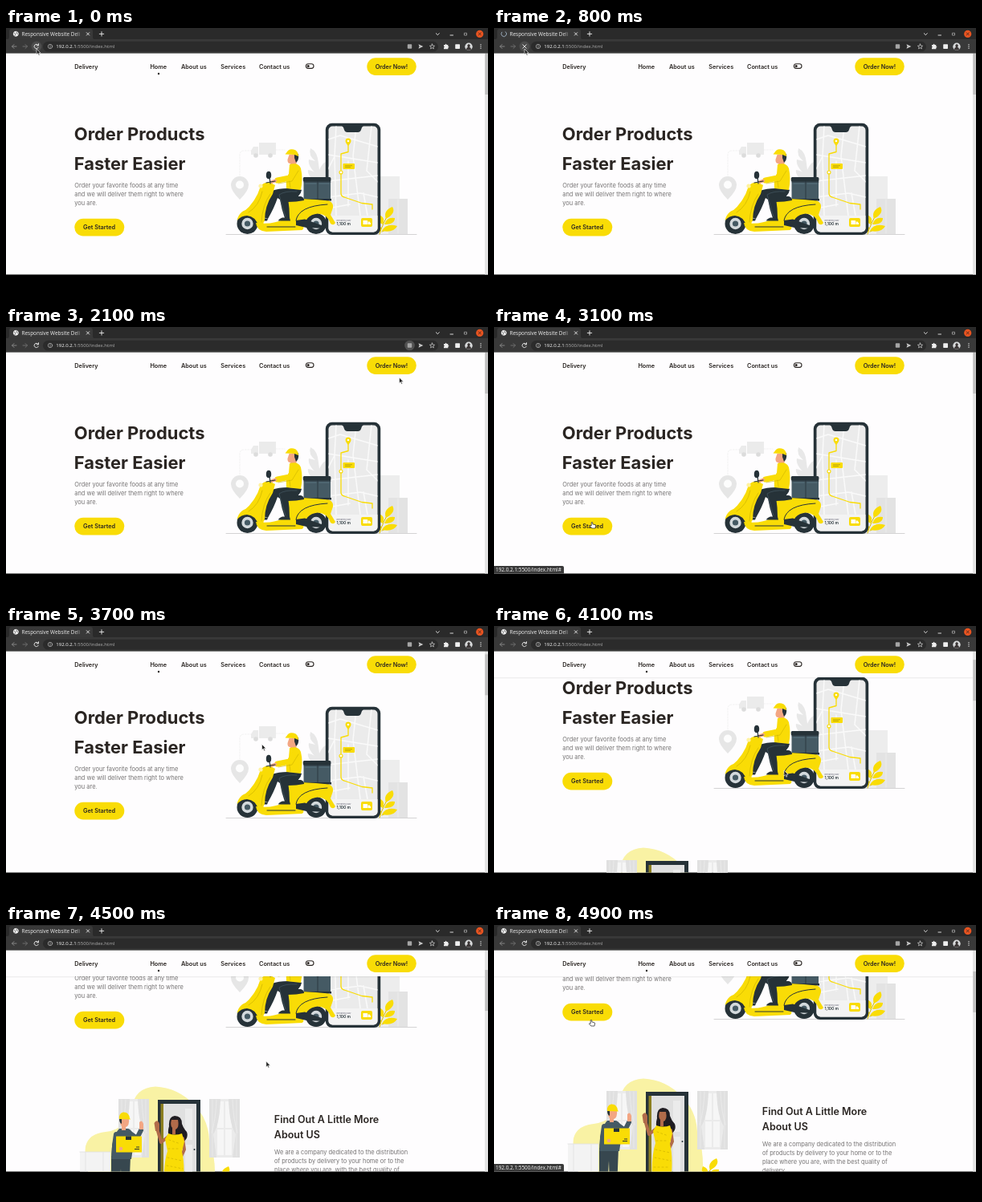
Recreate the animation shown at these times as an HTML page. Size 600 by 338 pixels, loop 5000 ms.

```html
<!DOCTYPE html>
<html lang="en">
<head>
<meta charset="utf-8">
<title>Delivery page tour</title>
<style>
html, body { margin: 0; width: 100%; height: 100%; overflow: hidden; background: #000; }
svg { display: block; width: 100vw; height: 100vh; }
text { font-family: Inter, "Open Sans", sans-serif; white-space: pre; }
.ui { font-family: "Noto Sans", "Open Sans", sans-serif; }
.nav { font-size: 7.3px; font-weight: 600; fill: #2a2522; }
.h1 { font-size: 21.9px; font-weight: 700; fill: #2a2522; }
.h2 { font-size: 12.5px; font-weight: 600; fill: #2a2522; }
.p { font-size: 7.45px; fill: #757373; }
.y { fill: #f9dc06; }
.d { fill: #263238; }
.s { fill: #455a64; }
.skin { fill: #f3a683; }
.brown { fill: #b16b4a; }
.line { fill: none; stroke-linecap: round; stroke-linejoin: round; }
</style>
</head>
<body>
<svg viewBox="0 0 600 338">
<defs>
  <clipPath id="view"><rect y="31" width="600" height="276.500"/></clipPath>
  <clipPath id="screen"><rect x="401.500" y="122.500" width="61" height="132" rx="5"/></clipPath>
  <linearGradient id="fade"><stop stop-color="#393939" stop-opacity="0"/><stop offset="1" stop-color="#393939"/></linearGradient>
  <linearGradient id="shade" x2="0" y2="1"><stop stop-color="#000" stop-opacity=".08"/><stop offset="1" stop-color="#000" stop-opacity="0"/></linearGradient>
  <g id="window">
    <path fill="#ebebeb" d="M0 0H38V73H0Z"/>
    <path fill="#f6f6f6" d="M10 3H18V36H10ZM20 3H28V36H20ZM10 38H18V70H10ZM20 38H28V70H20Z"/>
    <path fill="#e0e0e0" d="M0 0H14Q13 32 5 44L9 73H0ZM38 0H24Q25 32 33 44L29 73H38Z"/>
    <path class="line" stroke="#ededed" stroke-width=".8" d="M4 1V71M9 1Q8 26 3 42M34 1V71M29 1Q30 26 35 42"/>
  </g>
  <g id="plant">
    <path class="line" stroke="#d9bd00" stroke-width="1" d="M0 0Q4 -14 15 -32M3 -3Q11 -8 20 -9"/>
    <path class="y" d="M8 -19Q4 -29 16 -34Q21 -26 8 -19ZM4 -12Q-5 -16 -1 -24Q8 -21 4 -12ZM6 -12Q9 -22 19 -20Q19 -12 6 -12ZM3 -4Q8 -14 22 -10Q17 -1 3 -4ZM1 -2Q-4 -6 -3 -12Q4 -10 1 -2Z"/>
  </g>
  <g id="wheel">
    <circle class="d" r="13"/>
    <circle r="7.200" fill="#d3d9dc"/>
    <circle class="s" r="3.600"/>
  </g>
</defs>

<g clip-path="url(#view)">
  <rect y="31" width="600" height="277" fill="#fefdfe"/>
  <g id="page">
    <text class="h1" x="84.800" y="139.800">Order Products</text>
    <text class="h1" x="84.800" y="176.800">Faster Easier</text>
    <text class="p" x="85.300" y="198.800">Order your favorite foods at any time</text>
    <text class="p" x="85.300" y="209.800">and we will deliver them right to where</text>
    <text class="p" x="85.300" y="220.600">you are.</text>
    <rect class="y" x="85.300" y="237.800" width="62" height="21.600" rx="10.800"/>
    <text class="nav" x="96" y="251.200">Get Started</text>

    <!-- hero scenery -->
    <path class="line" stroke="#ececec" stroke-width=".7" stroke-dasharray="2 1.5" d="M291 184V158Q291 153 297 153H305M336 152H347"/>
    <path fill="#ebebeb" d="M315 143H336V158H315ZM305 158V153L308 148H314V158Z"/>
    <g fill="#dcdcdc"><circle cx="311" cy="159" r="2.800"/><circle cx="329" cy="159" r="2.800"/></g>
    <path fill="#e6e6e6" d="M291 214Q280 203 280 196A11 11 0 0 1 302 196Q302 203 291 214Z"/>
    <circle cx="291" cy="195.500" r="5" fill="#fdfdfd"/>
    <path fill="#e8e8e8" d="M385 166Q376 159 379 150Q388 154 389 169L390 177Q394 168 398 167V196H390Q374 184 376 177Q384 178 388 184Q375 172 377 164Z"/>
    <path fill="#ededed" d="M464 185H490V257H464Z"/>
    <path fill="#e3e3e3" d="M476 213H500V257H476Z"/>
    <path class="line" stroke="#f0f0f0" stroke-width=".8" d="M488 214V256"/>
    <path class="line" stroke="#c9c9c9" stroke-width=".8" d="M274 257.500H511"/>
    <use href="#plant" transform="translate(465 257)"/>

    <!-- phone -->
    <rect class="d" x="397.800" y="118.800" width="68.400" height="139.200" rx="8"/>
    <g clip-path="url(#screen)">
      <rect x="401" y="122" width="62" height="133" fill="#ebebeb"/>
      <path class="line" stroke="#fafafa" stroke-width="1.500" d="M401 139L416 134L463 148M411 122L409 160L401 176M401 158L463 168M436 122L432 160L441 234M455 122L449 178L463 192M401 191L463 184M409 160L411 234M401 211L441 206L463 211M426 166V222M445 206L450 234M401 225L428 220"/>
      <path class="line" stroke="#f9dc06" stroke-width="1.300" d="M426 143V154.500L417 157V206Q417 210 421 211L443 218.500L456 220V226"/>
      <path class="y" d="M426 147Q422.500 143 422.500 141A3.500 3.500 0 0 1 429.500 141Q429.500 143 426 147Z"/>
      <circle cx="426" cy="141" r="1.300" fill="#fff"/>
      <circle cx="417" cy="180" r="2" fill="#fff" stroke="#f9dc06" stroke-width="1.100"/>
      <rect class="y" x="419.500" y="169" width="14.500" height="7" rx="1"/>
      <path stroke="#a99500" stroke-width=".7" d="M422 171.700H431M422 173.500H429"/>
      <rect x="401" y="234" width="62" height="21" fill="#f3f3f3"/>
      <text x="411.500" y="241" font-size="2.500" fill="#667">Remaining way</text>
      <text x="411.500" y="246.300" font-size="4.900" font-weight="600" fill="#263238">1,100 m</text>
      <rect class="y" x="442" y="237" width="14" height="11" rx="2"/>
      <path fill="#fff" d="M444.500 240H450V245H444.500ZM450.500 241.500H452.500L454 243.500V245H450.500Z"/>
    </g>
    <path class="d" d="M417 121H446Q443 123 442 127Q441 130 438 130H425Q422 130 421 127Q420 123 417 121Z"/>

    <!-- scooter -->
    <use href="#wheel" x="386" y="244"/>
    <use href="#wheel" x="300.500" y="244"/>
    <rect class="s" x="370.500" y="188" width="33.500" height="26" rx="1.500"/>
    <rect class="d" x="369.800" y="186" width="34.600" height="5.500" rx="1.500"/>
    <path class="line" stroke="#263238" stroke-width=".8" d="M388 191V213M371 192H404"/>
    <path class="line" stroke="#607d8b" stroke-width=".7" d="M373 194H386M390 194H402"/>
    <path class="d" d="M366 213H405V215.500H366Z"/>
    <path class="y" d="M345 217C352 211 372 213 402 215.500Q408 218 407 224L404 233L410 243Q408 247 404 244Q400 232 388 231.500Q372 233 370 251L350 252Q346 232 345 217Z"/>
    <path class="y" d="M311 243Q332 246 346 238L372 239L369 252L324 254Q312 253 311 243Z"/>
    <path class="line" stroke="#263238" stroke-width="1" d="M361 240Q364 222 400 220M325 248H360"/>
    <path class="d" d="M361 240L372 238.500L394 246.500L398 250L374 249L361 246Z"/>
    <path class="d" d="M346 214Q346 210 352 210H367Q371 211 371 215Q360 217.500 346 217Z"/>

    <!-- rider -->
    <path class="d" d="M366 201Q344 198 331 203Q325 210 320 236L326 238Q334 224 338 212L341 214Q343 226 347 237H353Q353 225 351 212Q366 214 368 202Z"/>
    <path class="line" stroke="#455a64" stroke-width=".7" d="M362 204Q347 203 340 208Q343 220 348 235"/>
    <path class="d" d="M317 236.500L326 238L325 240.500H312Q312 238.500 317 236.500ZM344 236.500H353L354 240.500H339Q339 238.500 344 236.500Z"/>
    <path class="skin" d="M352.500 158H362V165L361 172H354V169Q350 169 350.500 164Z"/>
    <path class="d" d="M359 157H364Q365 165 361 168L359 162Z"/>
    <path class="y" d="M347.500 157.500L349.500 155Q352 150 358 151.500Q364 153 364 160L359 158Z"/>
    <path class="y" d="M353 170Q364 167 367 175Q370 188 367 202L349 200Q348 186 352 182Z"/>
    <path class="line" stroke="#f9dc06" stroke-width="7" d="M361 174L353 187L338 190"/>
    <path class="line" stroke="#cdb400" stroke-width=".6" d="M364 178L356 191L339 194M353 191L354 199"/>
    <path class="line" stroke="#f3a683" stroke-width="4" d="M335 190.500L331 192"/>

    <!-- front -->
    <path class="y" d="M317 197Q324 189 335 196L332 207Q322 222 322 240L317 249Q307 229 296 229Q311 217 317 197Z"/>
    <path class="y" d="M287.500 240Q291 225 307 226Q319 230 321 247L314 247Q311 235 300 234Q293 234 287.500 240Z"/>
    <path class="line" stroke="#cdb400" stroke-width=".7" d="M319 204Q315 222 302 230M329 207Q319 221 318 242"/>
    <path class="line" stroke="#263238" stroke-width="1.200" d="M329 194L328 186M324 193L335 191"/>
    <ellipse class="d" cx="327" cy="183.500" rx="3.200" ry="4.800"/>
    <circle cx="317" cy="197" r="2.600" fill="#fff3a0"/>

    <!-- about section -->
    <g transform="translate(0 140)">
      <path fill="#f9f2a4" d="M157 218Q160 193 186 191.500Q214 193 234 214Q252 232 253 258Q264 286 258 330H112Q96 286 99 266Q103 250 124 248Q148 246 157 218Z"/>
      <use href="#window" x="140" y="207"/>
      <use href="#window" x="253" y="207"/>
      <path fill="#f3f3f3" d="M92 273H130V330H92Z"/>
      <path class="line" stroke="#dfdfdf" stroke-width=".8" d="M92 273H130M99 274V308M121 274V308"/>
      <path class="d" d="M189 208H242V330H189Z"/>
      <path fill="#8c7f20" d="M192.500 213H196V330H192.500Z"/>
      <path fill="#e0e0e0" d="M196 213H237V330H196Z"/>
      <path fill="#ebebeb" d="M223 219H232V258H223ZM223 264H232V308H223Z"/>
      <circle class="d" cx="234.500" cy="270" r="1"/>
      <use href="#plant" transform="translate(261 325)"/>

      <path fill="#37474f" d="M131 278H155L153 330H144L143 294L141 330H131Z"/>
      <path class="s" d="M141 244H152Q158 246 160 256L156 282H131Q131 254 141 244Z"/>
      <path class="skin" d="M142 230H153Q154 241 149 242V246H144V241Q141 238 142 230Z"/>
      <path class="d" d="M141 231H144V238Q141 237 141 231Z"/>
      <path class="y" d="M141 232Q140 225 146 223.500Q153 223 154 231L155 232.500Z"/>
      <path class="line" stroke="#455a64" stroke-width="6" d="M137 251L135 265L142 268M156 251L163 256L168 246"/>
      <path class="skin" d="M166 245L166 236Q169 232 171 238L171 245Z"/>
      <rect class="y" x="137" y="253.500" width="32" height="20" rx=".6"/>
      <path fill="#263238" d="M149 253.500H156V258H149ZM160 269H166V270H160ZM162 266.500H166V267.500H162Z"/>
      <circle class="skin" cx="143" cy="269" r="2.300"/>

      <path fill="#201d22" d="M203 241Q202 229 210 228Q219 228 219 238Q221 244 225 248Q228 256 219 262L205 259Q200 251 203 241Z"/>
      <path class="brown" d="M206 233H214Q216 243 211 245V251H207V243Q204 240 206 233Z"/>
      <path class="line" stroke="#b16b4a" stroke-width="4" d="M202 254L193 261L189 247M220 256L222 270L217 281"/>
      <path class="brown" d="M186 247L184.500 237Q188 231 191 238L191 247Z"/>
      <path class="y" d="M202 250Q211 253 219 250L222 260L219 273Q224 292 219 330H197Q195 290 201 272L198 257Z"/>
      <path class="line" stroke="#cfb400" stroke-width=".7" stroke-dasharray="2 3" d="M203 258L217 263M202 269H217M201 280L219 284M200 290L220 294M199 302H219"/>

      <text class="h2" x="333.800" y="237.300">Find Out A Little More</text>
      <text class="h2" x="333.800" y="255.800">About US</text>
      <text class="p" x="334" y="276.300">We are a company dedicated to the distribution</text>
      <text class="p" x="334" y="287.300">of products by delivery to your home or to the</text>
      <text class="p" x="334" y="298.300">place where you are, with the best quality of</text>
      <text class="p" x="334" y="309.300">delivery.</text>
    </g>
  </g>

  <rect id="shadow" y="64" width="596" height="2" fill="url(#shade)"/>
  <rect y="31" width="596" height="33" fill="#fefdfe"/>
  <g class="nav">
    <text x="85.300" y="50.500">Delivery</text>
    <text x="179.400" y="50.500">Home</text>
    <text x="218" y="50.500">About us</text>
    <text x="267.300" y="50.500">Services</text>
    <text x="315" y="50.500">Contact us</text>
    <circle id="dot" cx="190" cy="57" r="1.200"/>
    <rect x="373.400" y="44.800" width="9.600" height="5.600" rx="2.800" fill="none" stroke="#2a2522" stroke-width="1.100"/>
    <circle cx="376.200" cy="47.600" r="1.500"/>
    <rect class="y" x="449.300" y="37.300" width="61.500" height="21.600" rx="10.800"/>
    <text x="459.700" y="50.700">Order Now!</text>
  </g>
  <rect x="596" y="31" width="4" height="277" fill="#e4e4e4"/>
  <rect id="thumb" x="596.300" y="32" width="3.700" height="51" fill="#c0c0c0"/>
  <g id="status">
    <path fill="#393939" d="M0 298H85Q87 298 87 300V308H0Z"/>
    <text class="ui" x="2" y="305.400" font-size="6.400" fill="#eee">192.0.2.1:5500/index.html#</text>
  </g>
</g>

<!-- browser frame -->
<rect width="600" height="15" fill="#2a2a2a"/>
<rect y="14" width="600" height="17.600" fill="#393939"/>
<path fill="#393939" d="M1 14.500Q4 14 4 11V4Q4 1 7 1H105Q108 1 108 4V11Q108 14 111 14.500Z"/>
<g class="line" stroke="#eee" stroke-width=".9">
  <g id="globe"><circle cx="12.300" cy="7.300" r="3" fill="#eee"/><path stroke="#555" stroke-width=".7" d="M10 6L12 7.500L11 9.500M13.500 4.800L13 6.500L15 7.500"/></g>
  <path id="spin" stroke="#9ab" d="M12.300 4A3.300 3.300 0 1 1 9 7.300"/>
  <path d="M100.300 5.700L103.700 9.100M103.700 5.700L100.300 9.100M116.300 7.400H121.700M119 4.700V10.100"/>
  <path d="M535.300 6.700L537.300 8.700L539.300 6.700M553 9H556.500"/>
  <path stroke="#bbb" stroke-width=".7" d="M570.800 6.300H573.500V9H570.800Z"/>
</g>
<text class="ui" x="19.500" y="9.700" font-size="6.400" fill="#e4e4e4">Responsive Website Deli</text>
<rect x="86" y="2" width="11" height="11" fill="url(#fade)"/>
<circle cx="589.700" cy="7.400" r="4.600" fill="#e95420"/>
<path class="line" stroke="#4a2a20" stroke-width=".9" d="M588.200 5.900L591.200 8.900M591.200 5.900L588.200 8.900"/>

<rect x="46" y="16.800" width="492" height="12.800" rx="6.400" fill="#2b2b2b"/>
<circle id="hover" cx="38" cy="23" r="6.500" fill="#4c4c4c"/>
<g class="line" stroke="#e2e2e2" stroke-width="1">
  <path stroke="#858585" d="M13 23H7.500M10 20.500L7.500 23L10 25.500"/>
  <path stroke="#6c6c6c" d="M21 23H26.500M24 20.500L26.500 23L24 25.500"/>
  <path id="reload" d="M40.300 24.200A2.700 2.700 0 1 1 40 21.300M40.500 19.700V21.900H38.300"/>
  <path id="stop" d="M35.800 20.800L40.200 25.200M40.200 20.800L35.800 25.200"/>
  <g stroke="#b9b9b9" stroke-width=".7"><circle cx="55" cy="23" r="2.700"/><path d="M55 22.700V24.400M55 21.400V21.500"/></g>
</g>
<text class="ui" x="62.300" y="25.200" font-size="6" fill="#a5a5a5"><tspan fill="#f0f0f0">192.0.2.1</tspan>:5500/index.html</text>
<circle id="lit" cx="502.500" cy="23" r="6.300" fill="#515151"/>
<rect x="499.800" y="20.300" width="5.400" height="5.400" rx=".8" fill="#a5a5a5"/>
<path fill="#d0d0d0" d="M513.500 20.200L519.300 23L513.500 25.800L514.300 23.300L517 23L514.300 22.700Z"/>
<path class="line" stroke="#c4c4c4" stroke-width=".8" d="M530.500 20L531.400 22.100L533.600 22.300L531.900 23.700L532.400 25.900L530.500 24.700L528.600 25.900L529.100 23.700L527.400 22.300L529.600 22.100Z"/>
<path fill="#eee" d="M545 21H546.700Q547.500 18.600 548.500 21H550.300V22.700Q552.600 23.500 550.300 24.500V26.200H545V24.500Q546.800 23.600 545 22.700Z"/>
<rect x="559.200" y="20.200" width="5.800" height="5.800" rx=".7" fill="#eee"/>
<circle cx="576" cy="23.200" r="4.700" fill="#d8dadb"/>
<path fill="#3a3535" d="M573 26.700Q573 24.300 575 24Q573.300 21 576 20Q579 21 577 24Q579 24.300 579 26.700Q576 28.800 573 26.700Z"/>
<g fill="#ddd"><circle cx="591" cy="20.700" r=".7"/><circle cx="591" cy="23" r=".7"/><circle cx="591" cy="25.300" r=".7"/></g>

<g id="popup">
  <rect x="361.500" y="32" width="178" height="42" rx="3" fill="#000" opacity=".13"/>
  <rect x="362.700" y="31" width="175.600" height="41.500" rx="2" fill="#454545"/>
  <rect x="362.700" y="31" width="175.600" height="17" fill="#3c3c3c"/>
  <path fill="#303030" d="M407 47H455V48H407Z"/>
  <path fill="#e95420" d="M370 46.800H407V48H370Z"/>
  <text class="ui" x="378.800" y="42.800" font-size="6.100" font-weight="700" fill="#f4f4f4">inglês</text>
  <text class="ui" x="415" y="42.800" font-size="6.300" fill="#a0a0a0">português</text>
  <text class="ui" x="371" y="63.400" font-size="5.200" fill="#636363">Lumiva Tradutor</text>
  <g fill="#eee"><circle cx="514" cy="38.700" r=".8"/><circle cx="514" cy="41" r=".8"/><circle cx="514" cy="43.300" r=".8"/></g>
  <path class="line" stroke="#eee" stroke-width="1.100" d="M525.600 39L529.400 42.800M529.400 39L525.600 42.800"/>
</g>

<g id="cursor" stroke-linejoin="round">
  <path id="arrow" fill="#222" stroke="#fff" stroke-width=".6" d="M0 0V7.200L1.700 5.600L2.800 8.200L4 7.700L2.900 5.200H5.200Z"/>
  <path id="hand" fill="#fff" stroke="#222" stroke-width=".7" d="M-.8 .8Q0 -.4 .8 .8V3L4 3.700Q4.800 4 4.600 5L4 8H-.2L-2.600 5.200Q-2.600 4 -.8 5Z"/>
</g>
</svg>
<script>
const LOOP = 5000, STEP = 100;
const el = id => document.getElementById(id);
const show = (id, on) => el(id).setAttribute("display", on ? "inline" : "none");
const move = (id, x, y) => el(id).setAttribute("transform", `translate(${x} ${y})`);
const linear = u => u;
const smooth = u => u * u * (3 - 2 * u);

// rows of [time, value, value...]
const scrollPath = [[3600, 0], [3700, 18], [4000, 37], [4100, 55], [4300, 93], [4500, 130], [4600, 140]];
const cursorPath = [
  [1300, 38, 26], [1800, 526, 39], [1950, 526, 39], [2100, 489.5, 63], [2400, 486, 47],
  [3100, 122, 243], [3300, 125, 246], [3700, 318.5, 147.5], [4000, 361, 180],
  [4400, 361, 180], [4800, 123, 116.5], [4900, 121, 118]
];

function at(path, t, ease) {
  const i = path.findIndex(k => k[0] > t);
  if (i === 0) return path[0].slice(1);
  if (i < 0) return path[path.length - 1].slice(1);
  const a = path[i - 1], b = path[i];
  const u = ease((t - a[0]) / (b[0] - a[0]));
  return a.slice(1).map((v, j) => v + (b[j + 1] - v) * u);
}

const inside = (x, y, left, top) => x > left && x < left + 62 && y > top && y < top + 22;

function draw(t) {
  const [scroll] = at(scrollPath, t, linear);
  const [x, y] = at(cursorPath, t, smooth);
  const loading = t >= 700 && t < 900;
  const popup = t >= 1000 && t < 2000;
  const onStart = inside(x, y, 85.5, 238 - scroll);
  const onOrder = !popup && inside(x, y, 449, 37);

  move("page", 0, -scroll);
  move("thumb", 0, scroll * 0.185);
  move("cursor", x, y);
  show("shadow", scroll >= 50);
  show("dot", t < 800 || scroll > 0);
  show("globe", !loading);
  show("spin", loading);
  el("spin").setAttribute("transform", `rotate(${t * 0.5} 12.3 7.3)`);
  show("reload", !loading);
  show("stop", loading);
  show("hover", t < 1400);
  show("lit", t >= 1000 && t < 2300);
  show("popup", popup);
  show("status", onStart);
  show("hand", onStart || onOrder);
  show("arrow", !(onStart || onOrder));
}

function tick() {
  const t = performance.now() % LOOP;
  draw(Math.floor(t / STEP) * STEP);
  requestAnimationFrame(tick);
}
tick();
</script>
</body>
</html>
```
